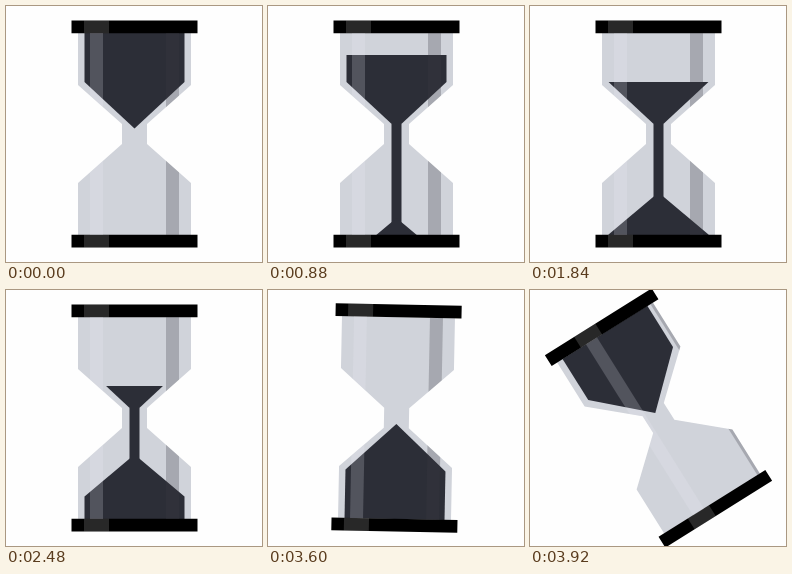
Write an HTML page with a canvas that moves like this. It is 256 px wide and 256 px high and loops after 4000 ms.

```html
<!DOCTYPE html>
<html lang="en">
<head>
<meta charset="utf-8">
<title>Hourglass</title>
<style>
  html, body { margin: 0; width: 100%; height: 100%; overflow: hidden; background: #fefefe; }
  canvas { display: block; width: 256px; height: 256px; }
</style>
</head>
<body>
<canvas id="stage" width="256" height="256"></canvas>
<script>
const ctx = document.getElementById('stage').getContext('2d');
const LOOP = 4000;
const TURN = { start: 3577, span: 476 };

// Coordinates are relative to the centre of the hourglass.
const CX = 128.5, CY = 128;
const HALF = 50, FLOOR = 101, SHOULDER = -52, TIP = -5.5, SLOPE = 0.93;
const SAND = '#2c2e37', GLASS = '#d0d3da';

// [time, value] steps
const SURFACE = [[80, -101], [560, -89], [880, -79], [1840, -52], [2480, -32], [2880, -19], [3180, -10], [3340, 5]];
const HEAP = [[360, 101], [880, 84], [1840, 58.6], [2240, 45], [2480, 36.5], [2880, 21.5], [3340, 6]];
const HEAP_SLOPE = [[2880, 0.84], [3340, SLOPE]];
const STREAM = [[80, -5], [360, 101]];

const clamp = (v, lo, hi) => Math.min(hi, Math.max(lo, v));
const mix = (a, b, k) => a + (b - a) * k;

function at(steps, t) {
  if (t <= steps[0][0]) return steps[0][1];
  for (let i = 1; i < steps.length; i++) {
    const [t0, y0] = steps[i - 1], [t1, y1] = steps[i];
    if (t < t1) return mix(y0, y1, (t - t0) / (t1 - t0));
  }
  return steps[steps.length - 1][1];
}

// Closed shape from its right-hand points, mirrored to the left.
function mirrored(points) {
  const path = new Path2D();
  points.forEach(([x, y]) => path.lineTo(x, y));
  [...points].reverse().forEach(([x, y]) => path.lineTo(-x, y));
  path.closePath();
  return path;
}

const glass = mirrored([[56.5, -101], [56.5, -49], [12.5, -10], [12.5, 10], [56.5, 49], [56.5, 101]]);
const caps = new Path2D();
caps.rect(-63, -113.5, 126, 12.8);
caps.rect(-63, 100.7, 126, 12.8);

function fill(path, color) {
  ctx.fillStyle = color;
  ctx.fill(path);
}

function drawSand(t) {
  const top = at(SURFACE, t);
  const heap = at(HEAP, t);
  const slope = at(HEAP_SLOPE, t);
  const end = Math.min(at(STREAM, t), heap + 5);

  if (top < SHOULDER) {
    fill(mirrored([[HALF, top], [HALF, SHOULDER], [0, TIP]]), SAND);
  } else if (top < TIP) {
    fill(mirrored([[(TIP - top) / SLOPE, top], [0, TIP]]), SAND);
  }

  const from = Math.max(top, -10);
  if (t > 80 && t < 3340 && end > from) {
    ctx.fillStyle = SAND;
    ctx.fillRect(-5, from, 10, end - from);
  }

  if (heap < FLOOR) {
    const w = Math.min(HALF, (FLOOR - heap) / slope);
    fill(mirrored([[0, heap], [w, heap + w * slope], [w, FLOOR]]), SAND);
  }
}

function strip(clip, center, width, color) {
  ctx.save();
  ctx.clip(clip);
  ctx.fillStyle = color;
  ctx.fillRect(center - width / 2, -114, width, 228);
  ctx.restore();
}

// Reflections slide across the glass while it turns.
function drawLight(angle) {
  const side = 38;
  const shift = 2 * side * (angle / Math.PI) ** 1.75;
  const shine = 'rgba(235,236,242,.2)', shade = 'rgba(60,60,64,.28)';
  strip(caps, shift - side, 25, 'rgba(235,235,235,.17)');
  strip(glass, shift - side, 13, shine);
  strip(glass, shift + side, 13, shade);
  strip(glass, shift - 3 * side, 13, shade);
}

function draw(t) {
  const u = clamp((t - TURN.start) / TURN.span, 0, 1);
  const angle = Math.PI * (1 - Math.cos(Math.PI * u)) / 2;
  ctx.setTransform(1, 0, 0, 1, 0, 0);
  ctx.fillStyle = '#fefefe';
  ctx.fillRect(0, 0, 256, 256);
  ctx.translate(CX, CY);
  ctx.rotate(angle);
  fill(glass, GLASS);
  drawSand(t);
  fill(caps, '#000');
  drawLight(angle);
}

const begin = performance.now();
function tick() {
  draw((performance.now() - begin) % LOOP);
  requestAnimationFrame(tick);
}
tick();
</script>
</body>
</html>
```
